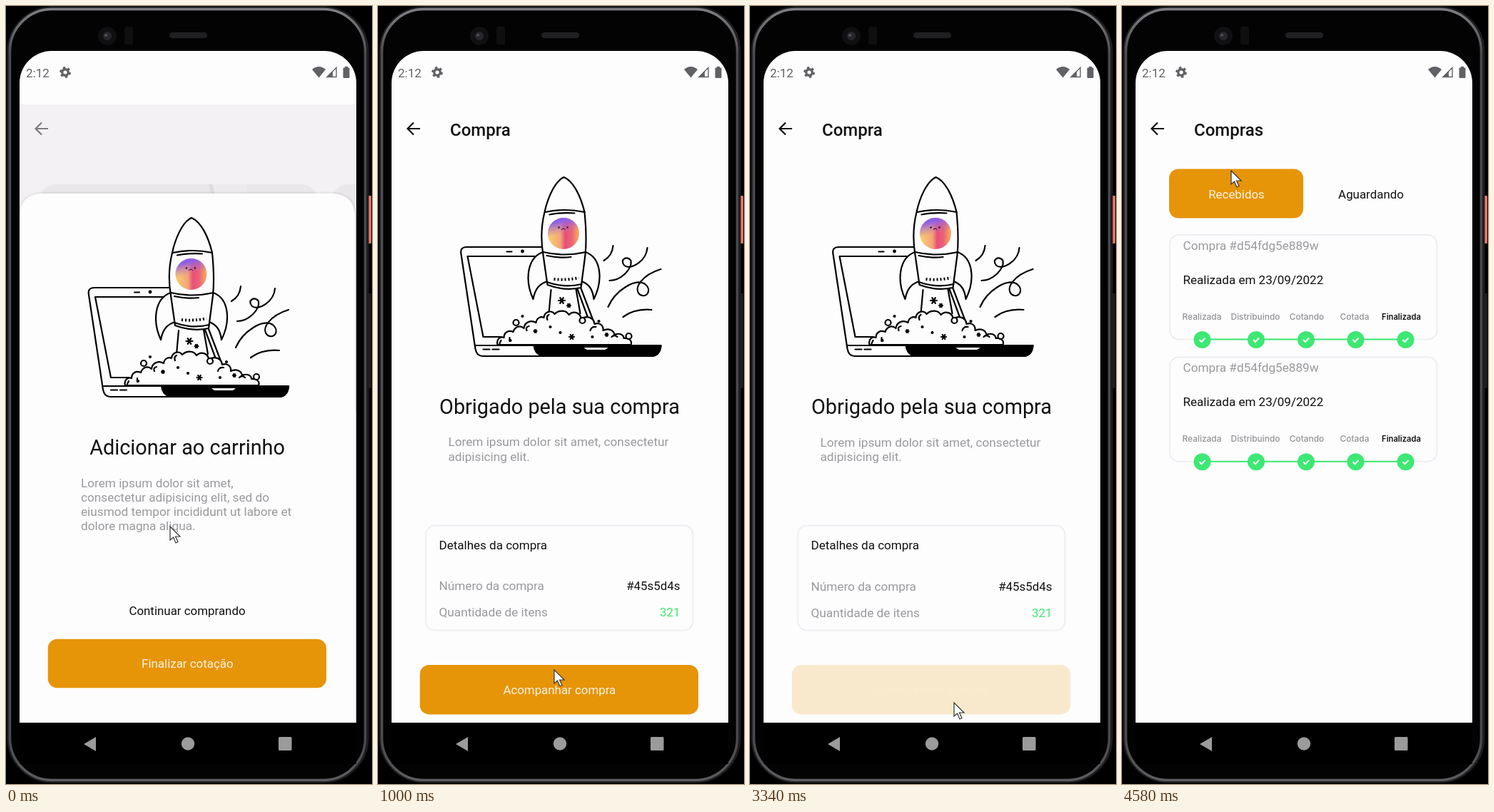
Animation of 513x1091 px, one loop 5.09 s. Source, as an HTML page:

```html
<!DOCTYPE html>
<html lang="pt">
<head>
<meta charset="utf-8">
<style>
html, body { margin: 0; height: 100%; overflow: hidden; background: #000; }
svg { display: block; width: 100vw; height: 100vh; font: 17.05px Roboto, sans-serif; }
.screen { transform-origin: 255px 572px; }
.ink { fill: none; stroke: #000; stroke-width: 2.2; stroke-linecap: round; stroke-linejoin: round; }
.paper { fill: #fefdfe; }
.gray { fill: #9a989c; font-size: 17.2px; }
.green { fill: #3de873; }
.light { fill: #fdf3e2; }
.box { fill: #fefdfe; stroke: #efeef3; stroke-width: 2.2; }
.mid { text-anchor: middle; font-size: 16.9px; }
.end { text-anchor: end; font-size: 16.9px; }
.title { font-size: 28.8px; }
.head { font-size: 24px; font-weight: 500; }
.step { font: 500 11.9px Inter, sans-serif; fill: #929094; }
.last { font-weight: 600; font-size: 11.2px; fill: #111; }
</style>
</head>
<body>
<svg id="stage" viewBox="0 0 513 1091"></svg>
<script>
const white = 'fill="#fefdfe"';
const text = (x, y, s, cls = '') => `<text x="${x}" y="${y}" class="${cls}">${s}</text>`;
const rect = (x, y, w, h, r, attrs = '') => `<rect x="${x}" y="${y}" width="${w}" height="${h}" rx="${r}" ${attrs}/>`;
const circle = (x, y, r, attrs = '') => `<circle cx="${x}" cy="${y}" r="${r}" ${attrs}/>`;
const path = (d, attrs = '') => `<path d="${d}" ${attrs}/>`;
const lines = (x, y, rows) => rows.map((s, i) => text(x, y + i * 20.2, s, 'gray')).join('');
const button = (id, x, y, w, h, s) => `<g id="${id}">${rect(x, y, w, h, 13, 'fill="#e69408"')}
  ${text(x + w / 2 + .5, y + h / 2 + 6.5, s, 'mid light')}</g>`;
const star = (x, y, r) => path([0, 60, 120].map(a => {
  const dx = r * Math.cos(a * Math.PI / 180), dy = r * Math.sin(a * Math.PI / 180);
  return `M${x - dx} ${y - dy}L${x + dx} ${y + dy}`;
}).join(''));
const header = s => path('M59 172H42M50 163.5L41.5 172L50 180.5', 'fill="none" stroke="#111" stroke-width="2.2"') +
  text(101, 182, s, 'head');
const screen = (id, body) => `<g id="${id}" class="screen">${rect(19, 138, 472, 867, 0, white)}${body}</g>`;

const rocket = `<g class="ink">
  ${path('M230 395H124q-10 0-8 10L136 538q2 10 10 10H384q11-1 12-15H137M231 408H125L147 521H172M180 401.5h7')}
  ${circle(202, 401, 1.3, 'fill="#000"')}
  ${path('M218 533H396q-2 14-13 15H229q-10-4-11-15Z', 'fill="#000"')}
  ${path('M288 536H322L318 539H292Z', 'fill="#fff" stroke="none"')}
  ${path('M147 538.5h9M160 538.5h9')}
  ${path('M242 455L239 492L303 503L284 453Z', 'class="paper" stroke="none"')}
  ${path('M242 455L239 488M277 454L283 488M279 454L293 492M284 453L303 503')}
  ${path('M167 532c-2-8 4-12 9-10c0-7 6-11 13-8c3-9 11-9 15-5c1-9 10-12 17-8c1-7 7-9 11-7c1-9 11-11 15-5c6-6 16-6 20 1c7-7 17-2 17 6c8-6 18-2 19 7c7-3 13 2 12 9c8-4 15 0 16 6c7-3 13 0 13 5c8-1 12 4 10 9Z', 'class="paper"')}
  ${path('M172 526l-2 4M184 522v5M208 512q-2-5 3-6M237 497q-2-5 2-7M297 512q2-6 8-5M327 521q4-4 8 0')}
  ${star(257, 470, 4.5)}${star(267, 477, 2.5)}${star(271, 521, 3.5)}${star(220, 513, 2)}${star(320, 518, 2)}
  ${[[202, 492], [309, 499], [255, 515], [241, 507], [300, 521], [185, 526]].map(([x, y]) => circle(x, y, 1, 'fill="#000"')).join('')}
  ${[[193, 501], [286, 498], [351, 520]].map(([x, y]) => circle(x, y, 4, 'class="paper"')).join('')}
  ${path('M231 402C208 410 205 442 217 468C220 451 228 446 237 443M290 402C313 410 315 442 302 468C300 452 294 447 285 443', 'class="paper"')}
  ${path('M260 297C247 303 237 327 233 346C228 366 228 388 231 406L237 448Q261 457 284 452L290 406C292 386 291 366 289 346C284 325 274 303 260 297Z', 'class="paper"')}
  ${path('M234 346Q261 340 289 346M240 349.5Q258 346 275 347.5M231 402Q260 409 291 402M236 407Q253 411 270 409M236 444Q261 453 285 447')}
  ${path('M246 440Q264 442 281 438', 'stroke-width="4" stroke-linecap="butt" stroke-dasharray="2 3"')}
  <g stroke="none">${circle(259.5, 376, 22, 'fill="url(#warm)"')}${circle(259.5, 376, 22, 'fill="url(#violet)"')}
  ${circle(253, 367.5, 1.3, 'fill="#222"')}${circle(265, 367.5, 1.3, 'fill="#222"')}</g>
  ${path('M256.5 370.5q2.5-3 5 0', 'stroke-width="1"')}
  ${path('M329 393q-1 14-13 21M377 396C376 414 354 428 345 421C337 413 349 406 354 414C356 426 340 442 324 442M322 479C332 456 360 438 374 447C384 456 376 467 367 462C356 453 370 434 396 426M343 493Q359 481 383 483')}
</g>`;

const home = screen('home', `${header('')}
  ${rect(46, 250, 391, 320, 24, 'fill="#eae9ea"')}${rect(456, 250, 391, 320, 24, 'fill="#eae9ea"')}
  ${path('M287 250H338V290H302Z', 'fill="#f1f0f1"')}
  ${path('M284 250h5l10 40h-5Z', 'fill="#d2d0d3"')}`);

const order = screen('order', `${header('Compra')}<g transform="translate(.5 -57)">${rocket}</g>
  ${text(254.5, 572, 'Obrigado pela sua compra', 'title mid')}
  ${lines(98.5, 617.5, ['Lorem ipsum dolor sit amet, consectetur', 'adipisicing elit.'])}
  ${rect(67, 728.5, 374.5, 147, 13, 'class="box"')}
  ${text(85.5, 762, 'Detalhes da compra')}
  ${text(85.5, 819.5, 'Número da compra', 'gray')}${text(423.5, 819.5, '#45s5d4s', 'end')}
  ${text(85.5, 856.5, 'Quantidade de itens', 'gray')}${text(423.5, 856.5, '321', 'end green')}
  ${button('track', 58.7, 924, 390.3, 69.4, 'Acompanhar compra')}`);

const stages = [['Realizada', 112, 112.5], ['Distribuindo', 187, 188], ['Cotando', 259, 258], ['Cotada', 326, 327.5], ['Finalizada', 391.5, 397.5]];
const card = dy => `<g transform="translate(0 ${dy})">
  ${rect(67, 321, 374.5, 146.5, 13, 'class="box"')}
  ${text(85.5, 341.5, 'Compra #d54fdg5e889w', 'gray')}
  ${text(85.5, 389.5, 'Realizada em 23/09/2022')}
  ${rect(112, 466.5, 285, 2, 0, 'class="green"')}
  ${stages.map(([s, x, cx], i) => text(x, 440, s, 'mid step' + (i == 4 ? ' last' : '')) + circle(cx, 468, 12, 'class="green"') +
    path(`M${cx - 4} 468l3 3l5-5.5`, 'fill="none" stroke="#fff" stroke-width="2"')).join('')}</g>`;
const orders = screen('orders', `${header('Compras')}
  ${button('tab', 66, 228.5, 188, 69, 'Recebidos')}${text(349, 270, 'Aguardando', 'mid')}
  ${card(0)}${card(171.3)}`);

const sheet = 'M19 1005V297Q19 263 53 263H455Q489 263 489 297V1005Z';
const modal = `<g id="modal">${rect(19, 138, 472, 867, 0, 'fill="#e9e5eb" opacity=".5"')}
  ${path(sheet, 'fill="#fff" stroke="#000" stroke-opacity=".05" stroke-width="5"')}${path(sheet, white)}
  ${rocket}${text(254, 629, 'Adicionar ao carrinho', 'title mid')}
  ${lines(105, 674.5, ['Lorem ipsum dolor sit amet,', 'consectetur adipisicing elit, sed do', 'eiusmod tempor incididunt ut labore et', 'dolore magna aliqua.'])}
  ${text(254, 853.5, 'Continuar comprando', 'mid')}
  ${button('finish', 58.7, 887.7, 390.3, 68.5, 'Finalizar cotação')}</g>`;

const phone = `
  ${rect(507, 266, 5, 67, 1, 'fill="#f0786a"')}${rect(508, 403, 4, 133, 1, 'fill="#1d1d20"')}
  ${rect(3, 2, 504, 1086, 62, 'fill="#030304" stroke="#1e1e21" stroke-width="3"')}
  ${rect(5.5, 4.5, 498, 1081, 59, 'fill="none" stroke="url(#rim)" stroke-width="3.5"')}
  ${circle(142, 42, 13, 'fill="#101013"')}${circle(142, 42, 6, 'fill="#26262b"')}${circle(140, 41, 2, 'fill="#50505a"')}
  ${rect(166, 29, 12, 25, 3, 'fill="#0f0f11"')}${rect(229, 37, 53, 8, 4, 'fill="#202022"')}
  ${rect(19, 1005, 472, 58, 0)}
  <g fill="#9b9b9b">${path('M109 1035L126 1025V1045Z')}${circle(255, 1034.5, 9.2)}${rect(382, 1025, 18.5, 19, 1.5)}</g>`;

const status = `<g fill="#626065">${text(28, 100, '2:12')}
  ${circle(83, 93, 4.3, 'fill="none" stroke="#626065" stroke-width="3.4"')}
  ${circle(83, 93, 6.6, 'fill="none" stroke="#626065" stroke-width="2.6" stroke-dasharray="3.456"')}
  ${path('M429 89Q438.5 81 448 89L438.5 100.5Z')}
  ${path('M450 99.5H463V86.5Z', 'fill="none" stroke="#626065" stroke-width="1.4"')}${path('M449 100L458 91V100Z')}
  ${rect(472.5, 86.5, 9, 14.5, 1.2)}${rect(475, 84.8, 4, 3, 0)}</g>`;

stage.innerHTML = `<defs>
  <linearGradient id="rim" x2="0" y2="1"><stop stop-color="#808084"/><stop offset=".06" stop-color="#4a4a4e"/><stop offset=".95" stop-color="#4a4a4e"/><stop offset="1" stop-color="#5c5c60"/></linearGradient>
  <linearGradient id="warm"><stop stop-color="#f8d06c"/><stop offset=".4" stop-color="#f3a577"/><stop offset=".55" stop-color="#e94f78"/><stop offset=".75" stop-color="#ec6078"/><stop offset="1" stop-color="#f6b25e"/></linearGradient>
  <linearGradient id="violet" x2=".25" y2="1"><stop stop-color="#7d55ee"/><stop offset=".2" stop-color="#8f60e6"/><stop offset=".6" stop-color="#c070c0" stop-opacity="0"/></linearGradient>
  <clipPath id="glass">${path('M19 1005V108Q19 63 64 63H446Q491 63 491 108V1005Z'.replace('Q19 63', 'A45 45 0 0 1').replace('Q491 63', 'A45 45 0 0 1'))}</clipPath>
  <clipPath id="app">${rect(19, 138, 472, 867, 0)}</clipPath></defs>
  ${phone}<g clip-path="url(#glass)">${rect(19, 63, 472, 942, 0, white)}${status}
  <g clip-path="url(#app)" fill="#111">${rect(19, 138, 472, 867, 0, 'fill="#f2f2f2"')}${home}${order}${orders}${modal}</g></g>
  ${path('M0 0V19L4.5 15L8 23L11 21.5L7.5 14H14Z', 'id="cursor" fill="#fff" stroke="#333" stroke-width="1.2"')}`;

const $ = id => document.getElementById(id);
const clamp = v => Math.min(1, Math.max(0, v));

// cubic-bezier(.20833, .82, .25, 1)
function ease(x) {
  x = clamp(x);
  let lo = 0, hi = 1, s;
  for (let i = 0; i < 25; i++) {
    s = (lo + hi) / 2;
    const bx = 3 * (1 - s) ** 2 * s * .20833 + 3 * (1 - s) * s * s * .25 + s ** 3;
    if (bx < x) lo = s; else hi = s;
  }
  return x == 1 ? 1 : 3 * (1 - s) ** 2 * s * .82 + 3 * (1 - s) * s * s + s ** 3;
}

// label and plate fade separately, so the label sinks into the plate
function press(id, t, down, up) {
  const k = clamp((t - up) / 250);
  const back = k < .5 ? 2 * k * k : 1 - 2 * (1 - k) ** 2;
  for (const part of $(id).children) part.style.opacity = t < down ? 1 : .2 + .8 * back;
}

// enter and leave: progress of the screen's own arrival and of the next one's
function place(id, enter, leave) {
  const style = $(id).style;
  const opacity = leave > 0 ? clamp((1 - leave) / .7925) : clamp((enter - .75) / .125);
  style.transform = `scale(${.85 + .15 * enter + .075 * leave})`;
  style.opacity = opacity;
  style.visibility = opacity ? 'visible' : 'hidden';
}

const moves = [[0, 230, 730], [250, 247, 931], [1430, 255, 890], [1460, 263, 849], [1490, 270, 808], [1520, 278, 767],
  [3000, 282, 872], [3030, 286, 977], [4550, 220, 604], [4580, 153, 231]];

function render(now) {
  const t = now % 5090;
  const q = Math.floor((t - 10) / 30) * 30 + 10; // the screen refreshes every 30 ms
  const first = q < 612 ? 0 : ease((q - 612) / 400);
  const second = q < 3663 ? 0 : ease((q - 3663) / 400);
  place('home', 1, first);
  place('order', first, second);
  place('orders', second, 0);
  press('finish', q, 250, 580);
  press('track', q, 3340, 3624);
  const shown = clamp(1 - (q - 910) / 90);
  $('modal').style.opacity = shown;
  $('modal').style.visibility = shown ? 'visible' : 'hidden';
  const [, x, y] = moves.findLast(m => m[0] <= t);
  $('cursor').setAttribute('transform', `translate(${x} ${y})`);
}

const start = performance.now();
function tick() {
  render(performance.now() - start);
  requestAnimationFrame(tick);
}
tick();
</script>
</body>
</html>
```
